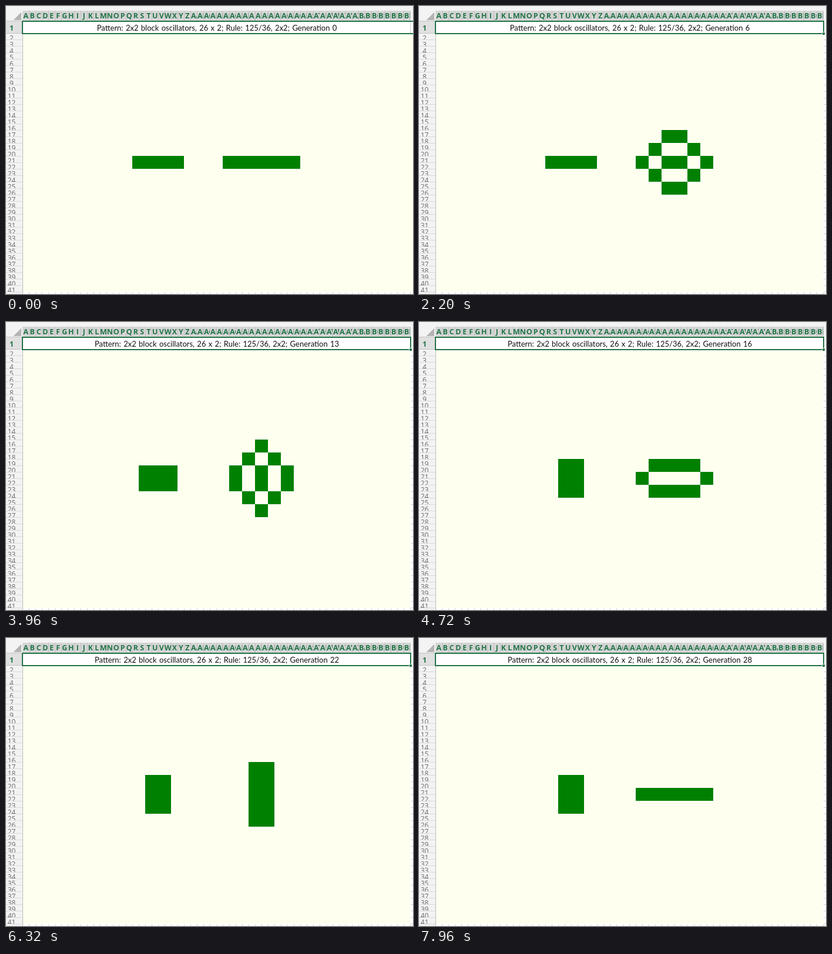
Recreate the animation shown at these times as an HTML page. Size 693 by 490 pixels, loop 8 s.

```html
<!DOCTYPE html>
<html lang="en">
<head>
<meta charset="utf-8">
<title>2x2 block oscillators</title>
<style>
  html, body { margin: 0; width: 100%; height: 100%; overflow: hidden; background: #fff; }
  svg { display: block; }
  .stage { position: absolute; left: 0; top: 0; }
  rect, path { shape-rendering: crispEdges; }
  .head { font: bold 12.5px "Open Sans", "Noto Sans", sans-serif; fill: #217346; }
  .row { font: 12px "Open Sans", "Noto Sans", sans-serif; fill: #6a6a6a; }
  .title { font: 13px Lato, sans-serif; word-spacing: 1px; fill: #111; }
  .mid { text-anchor: middle; }
</style>
</head>
<body>
<svg class="stage" id="stage" width="693" height="490" viewBox="0 0 693 490"></svg>
<script>
const LOOP = 8000, CELL = 11, LEFT = 28, TOP = 46, COLS = 60, ROWS = 40, SPLIT = 28;
const RIGHT = LEFT + COLS * CELL, BOTTOM = TOP + ROWS * CELL;
const GREEN = '#217346', IVORY = '#fffff0', GRID = '#d4d4d4';
const stage = document.getElementById('stage');

function add(tag, attrs, parent = stage) {
  const node = document.createElementNS('http://www.w3.org/2000/svg', tag);
  for (const key in attrs) node.setAttribute(key, attrs[key]);
  return parent.appendChild(node);
}
const box = (x, y, width, height, fill, parent) => add('rect', { x, y, width, height, fill }, parent);
function label(text, x, y, cls, parent) {
  const node = add('text', { x, y, class: cls }, parent);
  node.textContent = text;
  return node;
}
const clip = (x, y, width, height) => add('svg', { x, y, width, height, overflow: 'hidden' });

// Sheet background and gridlines outside the coloured area
box(0, 0, 693, 490, '#fff');
box(LEFT, TOP, COLS * CELL, ROWS * CELL, IVORY);
for (let c = 1; c <= COLS; c++) box(LEFT + c * CELL, BOTTOM + 1, 1, 3, GRID);
for (let r = 1; r <= ROWS; r++) box(RIGHT + 1, TOP + r * CELL, 4, 1, GRID);

// Column headers
box(0, 0, 693, 25, '#f3f3f3');
box(LEFT, 8, COLS * CELL, 17, '#d6d6d6');
add('path', { d: 'M26 10V24H12Z', fill: '#b4b4b4' });
for (let c = 0; c < COLS; c++) {
  const x = LEFT + c * CELL;
  const cell = clip(x, 8, CELL, 17);
  const letter = String.fromCharCode(65 + c % 26);
  if (c < 26) label(letter, 5.8, 13, 'head mid', cell);
  else label((c < 52 ? 'A' : 'B') + letter, 1, 13, 'head', cell);
  box(x + CELL, 8, 1, 17, '#c2c2c2');
}

// Row headers
box(0, 25, LEFT, 465, '#f3f3f3');
box(0, 26, LEFT, 20, '#e0e0e0');
label('1', 9.5, 42, 'head mid');
box(0, 25, LEFT, 1, '#c6c6c6');
box(0, 46, LEFT, 1, '#c6c6c6');
for (let r = 0; r < ROWS; r++) {
  const y = TOP + r * CELL;
  label(r + 2, 9.5, 13, 'row mid', clip(0, y, LEFT, CELL));
  box(0, y + CELL, LEFT, 1, '#d9d9d9');
}
box(28, 47, 1, 443, '#bcbcbc');

// Selection: overflowing at first, then closed at the right edge
const openEnd = add('g', {});
box(RIGHT, 48, 5, BOTTOM - 47, IVORY, openEnd);
box(RIGHT, 27, 1, 19, GRID, openEnd);
box(RIGHT, 25, 5, 2, GREEN, openEnd);
box(RIGHT, 46, 5, 2, GREEN, openEnd);
box(27, 25, RIGHT - 27, 2, GREEN);
box(27, 46, RIGHT - 27, 2, GREEN);
box(27, 25, 2, 23, GREEN);
const closedEnd = add('g', {});
box(RIGHT, 25, 2, 23, GREEN, closedEnd);
box(RIGHT - 2, 44, 6, 6, '#fff', closedEnd);
box(RIGHT - 1, 45, 4, 4, GREEN, closedEnd);

const title = label('', 359, 42, 'title mid');
const live = add('path', { fill: '#008000' });

// Survive on 1, 2 or 5 neighbours, be born on 3 or 6
function evolve(grid) {
  return grid.map((row, y) => row.map((alive, x) => {
    let n = -alive;
    for (let dy = -1; dy < 2; dy++)
      for (let dx = -1; dx < 2; dx++) n += grid[y + dy]?.[x + dx] || 0;
    return +(alive ? [1, 2, 5] : [3, 6]).includes(n);
  }));
}
const inSeed = (x, y) => (y === 19 || y === 20) && (x >= 17 && x < 25 || x >= 31 && x < 43);
const history = [Array.from({ length: ROWS }, (_, y) =>
  Array.from({ length: COLS }, (_, x) => +inSeed(x, y)))];
while (history.length < 29) history.push(evolve(history[history.length - 1]));

function outline(leftGen, rightGen) {
  let d = '';
  for (let y = 0; y < ROWS; y++)
    for (let x = 0; x < COLS; x++)
      if (history[x < SPLIT ? leftGen : rightGen][y][x])
        d += `M${LEFT + x * CELL} ${TOP + y * CELL}h11v11h-11z`;
  return d;
}

const times = [640, 860, 1080, 1280, 1480, 1760, 1980, 2200, 2440, 2680, 2880,
  3080, 3300, 3500, 3720, 3960, 4240, 4460, 4700, 4920, 5200, 5400, 5680,
  5880, 6100, 6320, 6560, 6760, 7000, 7220, 7440, 7680, 7960];
// At these steps only the left oscillator has been refreshed so far
const halfway = [640, 1480, 3720, 6100, 7440];
let gen = 0;
const states = [{ at: 0, gen, d: outline(0, 0) }];
for (const at of times) {
  const half = halfway.includes(at);
  if (!half) gen++;
  states.push({ at, gen, d: outline(gen + half, gen) });
}

let shown;
function draw(now) {
  const t = now % LOOP;
  openEnd.setAttribute('visibility', t < 200 ? 'visible' : 'hidden');
  closedEnd.setAttribute('visibility', t < 200 ? 'hidden' : 'visible');
  const state = states.findLast(s => s.at <= t);
  if (state !== shown) {
    shown = state;
    live.setAttribute('d', state.d);
    title.textContent = `Pattern: 2x2 block oscillators, 26 x 2; Rule: 125/36, 2x2; Generation ${state.gen}`;
  }
}
const start = performance.now();
function tick() {
  draw(performance.now() - start);
  requestAnimationFrame(tick);
}
tick();
</script>
</body>
</html>
```
